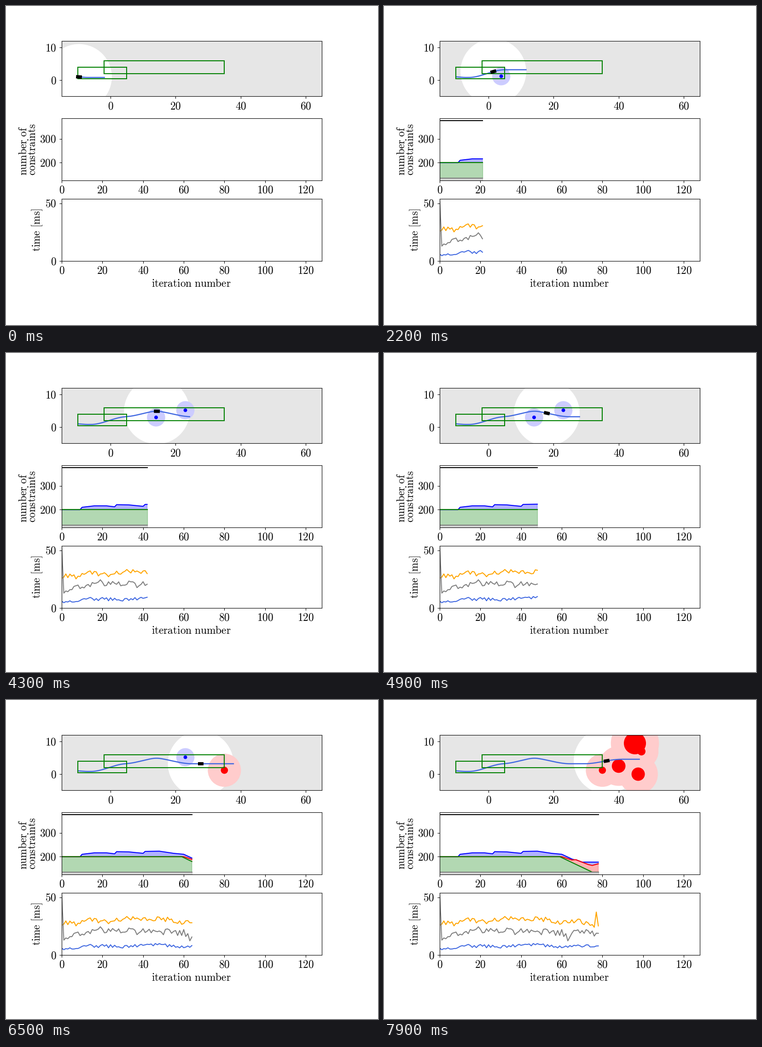
Animation, 808 px wide and 693 px high, one loop 8 s. Source, as a matplotlib script:

```python
import numpy as np
import matplotlib.pyplot as plt
from matplotlib.animation import FuncAnimation
from matplotlib.patches import Circle, Polygon, Rectangle

W, H, DPI = 808, 693, 100
FRAMES = 80
LEFT, RIGHT = 121.1, 686.3
STEPS = np.arange(FRAMES - 1)

plt.rcParams["mathtext.fontset"] = "cm"
fig = plt.figure(figsize=(W / DPI, H / DPI), dpi=DPI, facecolor="white")


def label(x, y, text, **kw):
    """Serif text with its baseline at pixel (x, y), counted from the top left."""
    text = r"$\mathrm{%s}$" % text.replace(" ", r"\ ")
    opts = dict(fontsize=16.8, ha="center", va="baseline", rotation_mode="anchor")
    fig.text(x / W, 1 - y / H, text, **{**opts, **kw})


def panel(top, bottom, xlim, ylim, xticks, yticks, face="white"):
    box = [LEFT / W, 1 - bottom / H, (RIGHT - LEFT) / W, (bottom - top) / H]
    ax = fig.add_axes(box, facecolor=face, xlim=xlim, ylim=ylim,
                      xticks=xticks, yticks=yticks)
    ax.tick_params(labelbottom=False, labelleft=False)
    for v in xticks:
        x = LEFT + (v - xlim[0]) / (xlim[1] - xlim[0]) * (RIGHT - LEFT)
        label(x, bottom + 27.7, str(v))
    for v in yticks:
        y = bottom - (v - ylim[0]) / (ylim[1] - ylim[0]) * (bottom - top)
        label(109.3, y + 8.2, str(v), ha="right")
    return ax


iters = range(0, 121, 20)
road_ax = panel(76.3, 196.4, (-15, 65), (-5, 12), range(0, 61, 20), (0, 10), "0.9")
count_ax = panel(244.2, 379.05, (0, 128), (125, 386), iters, (200, 300))
time_ax = panel(419.45, 554.3, (0, 128), (0, 53.7), iters, (0, 50))

label(45, 368.5, "number of", rotation=90, ha="left")
label(64, 368.5, "constraints", rotation=90, ha="left")
label(74.3, 487, "time [ms]", rotation=90)
label(402.8, 610, "iteration number")

# --- road scene ---
# Smooth ramps of the planned path: start x, end x, height, first step known
RAMPS = [(-11, -7, -0.22, 0), (-6, 5, 2.37, 10), (4, 15.5, 1.85, 27),
         (12.5, 25, -1.85, 41), (29.5, 41, 1.38, 68)]

# Obstacles: x, y, radius, first step, last step
SOFT = [(3.9, 1.2, 0.56, 10, 42), (14, 3, 0.56, 27, 58), (23, 5.2, 0.56, 41, 73)]
HARD = [(35, 1.2, 1.1, 59, FRAMES), (40, 2.5, 2.1, 66, FRAMES),
        (45, 9.5, 3.4, 74, FRAMES), (46, 0, 2.05, 76, FRAMES), (47, 7, 1.25, 78, FRAMES)]


def path_y(x, k):
    y = 1.05 + 0 * x
    for a, b, dy, first in RAMPS:
        if k >= first:
            t = np.clip((x - a) / (b - a), 0, 1)
            y = y + dy * t * t * (3 - 2 * t)
    return y


def car_x(k):
    return np.interp(k, [0, 4, 9, 18, 36, 79], [-9.7, -8.4, -6.3, -0.95, 9.95, 36.3])


def disc(x, y, r, color, z):
    return road_ax.add_patch(Circle((x, y), r, fc=color, lw=0, zorder=z))


view = disc(0, 0, 10.1, "white", 0.5)
spots = []
for group, margin, color, tint in [(SOFT, 2.24, "blue", "#ccccff"),
                                   (HARD, 4, "red", "#ffcccc")]:
    for x, y, r, first, last in group:
        parts = disc(x, y, r + margin, tint, 1), disc(x, y, r, color, 1.2)
        spots.append((parts, first, last))

path, = road_ax.plot([], [], color="royalblue", lw=1.8, zorder=2)
for x, y, w, h in [(-10, 0.5, 15, 3.5), (-2, 2, 37, 4)]:
    road_ax.add_patch(Rectangle((x, y), w, h, fill=False, ec="green", lw=1.5, zorder=2.2))
car = road_ax.add_patch(Polygon(np.zeros((4, 2)), fc="black", lw=0, zorder=3))
CORNERS = np.array([(-0.9, -0.52), (0.9, -0.52), (0.9, 0.52), (-0.9, 0.52)])


def trend(*knots):
    return np.interp(STEPS, *zip(*knots))


# --- constraint counts ---
floor = trend((0, 125))
grey = trend((0, 135))
black = trend((0, 376))
green = trend((59, 200), (75, 135))
red = trend((60, 200), (65, 186), (67, 187), (73, 167), (75, 163), (78, 170))
blue = trend((9, 200), (10, 210), (16, 216), (22, 216), (26, 212), (27, 221), (33, 220),
             (40, 214), (41, 222), (48, 223), (55, 214), (60, 210), (65, 190), (70, 177))
blue = np.maximum(blue, red)

bands = []
for low, high, color in [(floor, grey, "grey"), (grey, green, "green"),
                         (green, red, "red"), (red, blue, "blue")]:
    patch = count_ax.add_patch(Polygon(np.zeros((3, 2)), color=color, alpha=0.3, lw=1))
    bands.append((patch, low, high))

# --- computation times in ms: slow drift plus seeded jitter ---
rng = np.random.default_rng(4)


def jitter(size):
    return size * rng.uniform(-1, 1, len(STEPS)) * (STEPS > 1) * (STEPS < 77)


slow = jitter(2.2) + trend((0, 26), (4, 29), (8, 26), (12, 30.5), (22, 28.5), (32, 31.5),
                           (52, 31), (59, 27), (67, 30), (76, 26), (77, 37.3), (78, 25.3))
mid = jitter(3) + trend((0, 53.5), (1, 13), (7, 19), (18, 22), (40, 20.5), (60, 19.5),
                        (63, 14), (67, 20), (78, 18.9))
fast = jitter(1.4) + trend((0, 6), (1, 4.7), (3, 5), (14, 8), (30, 7.5), (47, 9),
                           (60, 7), (78, 8))

curves = [(ax.plot([], [], color=color, lw=1.5)[0], data) for ax, data, color in [
    (count_ax, blue, "blue"), (count_ax, red, "red"), (count_ax, green, "green"),
    (count_ax, grey, "grey"), (count_ax, black, "black"),
    (time_ax, slow, "orange"), (time_ax, mid, "grey"), (time_ax, fast, "royalblue")]]


def update(k):
    x = car_x(k)
    y = path_y(x, k)
    view.center = x, y
    xs = np.linspace(-10, x + min(10.05, 7.8 + 0.25 * k), 200)
    path.set_data(xs, path_y(xs, k))
    tilt = np.arctan((path_y(x + 0.3, k) - path_y(x - 0.3, k)) / 0.6)
    c, s = np.cos(tilt), np.sin(tilt)
    car.set_xy(CORNERS @ np.array([(c, s), (-s, c)]) + (x, y))
    for parts, first, last in spots:
        for part in parts:
            part.set_visible(first <= k <= last)

    for line, data in curves:
        line.set_data(STEPS[:k], data[:k])
    n = STEPS[:k]
    for patch, low, high in bands:
        # keep only the stretch where the band has some height
        use = n[high[n] > low[n]]
        patch.set_visible(len(use) > 1)
        if len(use) > 1:
            span = np.arange(max(use[0] - 1, 0), min(use[-1] + 1, n[-1]) + 1)
            edge = np.r_[span, span[::-1]]
            patch.set_xy(np.c_[edge, np.r_[low[span], high[span[::-1]]]])
    return []


anim = FuncAnimation(fig, update, frames=FRAMES, interval=100, repeat=True,
                     repeat_delay=0, blit=False)
plt.show()
```
